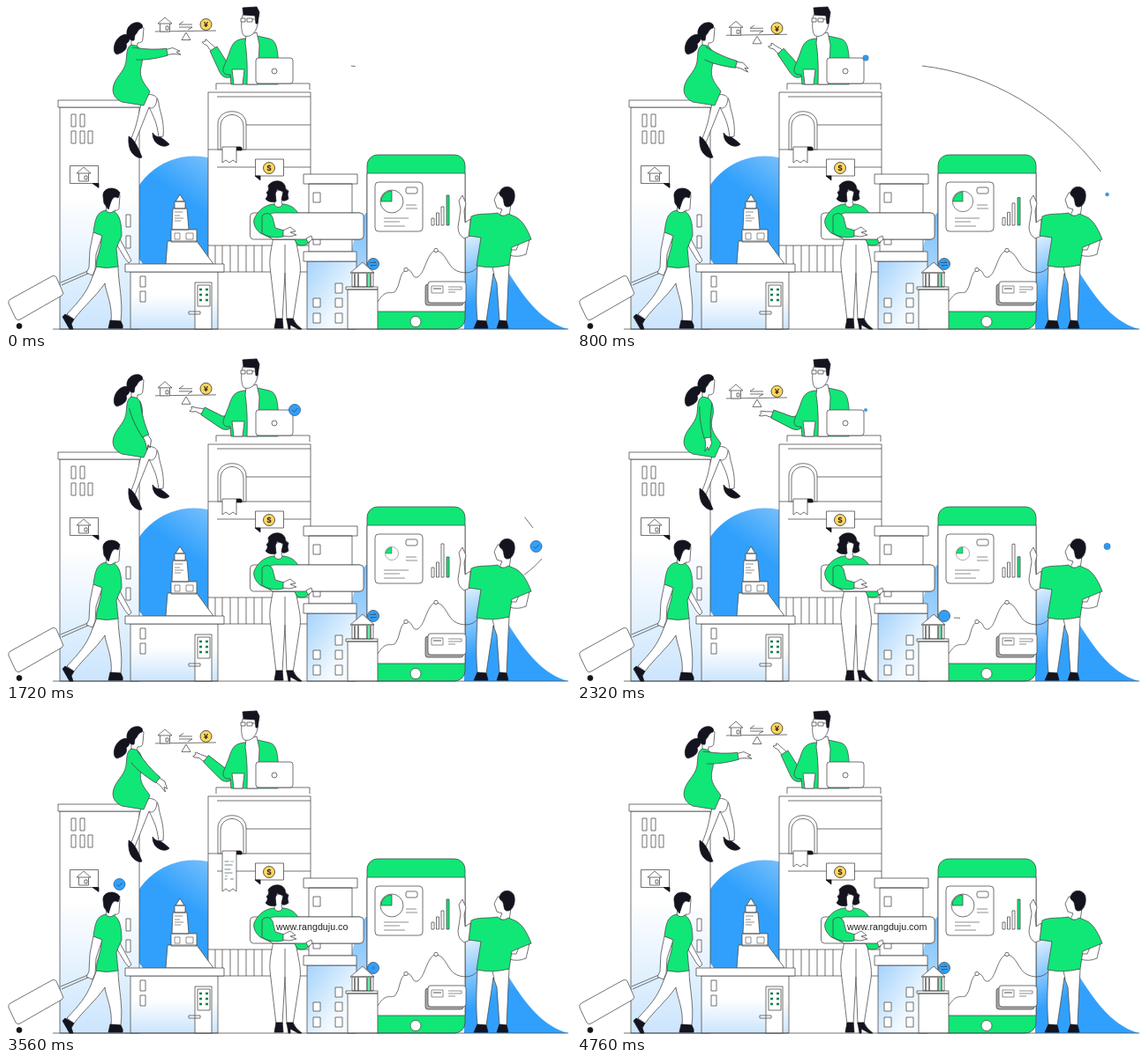
Recreate the animation shown at these times as an HTML page. Size 640 px wide and 368 px high, loop 4.8 s.

```html
<!DOCTYPE html>
<html lang="en">
<head>
<meta charset="utf-8">
<title>City services</title>
<style>
  html, body { margin: 0; width: 100%; height: 100%; overflow: hidden; background: #fff; }
  svg { display: block; width: 100vw; height: 100vh; fill: #fff; stroke: #444; stroke-width: .75; stroke-linejoin: round; }
  text { font-family: "Liberation Sans", Arial, sans-serif; fill: #222; stroke: none; }
  .line { fill: none; }
  .ink { fill: #14141f; stroke: #14141f; }
  .green { fill: #10e776; }
  .coin { fill: #ffd75e; stroke: #222; }
  .sign { font-size: 9px; font-weight: bold; text-anchor: middle; }
  .wash { fill: url(#wash); }
  .thin { fill: none; stroke-width: .6; }
</style>
</head>
<body>
<svg viewBox="0 0 640 368">
  <defs>
    <linearGradient id="wash" x1="0" y1="0" x2="0" y2="1">
      <stop offset=".4" stop-color="#fff"/><stop offset="1" stop-color="#cbe5fd"/>
    </linearGradient>
    <linearGradient id="mist" x1="0" y1="0" x2="1" y2="1">
      <stop offset="0" stop-color="#a4d3fc"/><stop offset=".7" stop-color="#f4faff"/>
    </linearGradient>
    <linearGradient id="sky" x1=".8" y1="0" x2=".4" y2=".45">
      <stop offset="0" stop-color="#8cc9fc"/><stop offset=".9" stop-color="#31a0fc"/>
    </linearGradient>
    <linearGradient id="hill" x1="0" y1="0" x2="0" y2="1">
      <stop offset="0" stop-color="#78bffb"/><stop offset="1" stop-color="#d8ebfe"/>
    </linearGradient>
    <linearGradient id="slope" gradientUnits="userSpaceOnUse" x1="520" y1="250" x2="556" y2="325">
      <stop offset=".1" stop-color="#e6f3ff"/><stop offset="1" stop-color="#31a0fc"/>
    </linearGradient>
    <clipPath id="paper"><path d="M240 166h30v60h-30z"/></clipPath>
    <g id="badge">
      <circle r="6.5" fill="#31a0fc" stroke="#1d568c"/>
      <path class="line" d="M-3 0l2.3 2.4 4-4.4"/>
    </g>
    <g id="house">
      <path d="M-5.5-1h11v10h-11z"/><path d="M-8 0L0-7 8 0z"/><path d="M1 3h3v4h-3z"/>
    </g>
  </defs>

  <!-- backdrop -->
  <path d="M155 293A75 75 0 1 1 271 293z" fill="url(#sky)" stroke="none"/>
  <path d="M380 367C388 290 395 240 410 234V367z" fill="url(#hill)" stroke="none"/>
  <path d="M519 250C560 255 575 350 637 367H519z" fill="url(#slope)" stroke="none"/>

  <!-- left tower -->
  <path class="wash" d="M61 115h90v252H61z"/>
  <path d="M59 107h97v8H59z"/>
  <path d="M74 123h5v14h-5zm10 0h5v14h-5zM74 142h5v14h-5zm10 0h5v14h-5zm9 0h5v14h-5zM136 237h5v14h-5zm0 24h5v14h-5z"/>
  <path id="arcC" class="line" pathLength="1" d="M408 298C300 305 190 282 138 215"/>

  <!-- central building -->
  <path d="M229 98h116v204H229z"/>
  <path class="line" d="M238 95V88H344V95M239 103H345M272 135H345M229 163H345M239 183H345M229 272H345M237 272v30M245 272v30M254 272v30M263 272v30M272 272v30M281 272v30M290 272v30"/>
  <path d="M240 163V134C240 115 272 115 272 134V163z"/>
  <path class="line" d="M243 163V137C243 119 269 119 269 137V163"/>
  <path class="ink" d="M261 160h4q3 0 2 4h-6z"/>
  <path id="receipt"/>
  <g clip-path="url(#paper)"><g id="print" class="thin">
    <path d="M247.5-34h5M247.5-30h9M247.5-25h7M247.5-21h9M247.5-14h3M254-14h4" stroke="#234"/>
    <path d="M254-34h4M248-17.5h3" stroke="#12b65f"/>
  </g></g>

  <!-- monument and low house -->
  <path d="M183 267h33l19 26H181zM187 254h29v14h-29zM189 230h16l2 24h-19zM191 222h12v8h-12zM192 222l5-8 5 8z"/>
  <path class="thin" d="M191 258h6v7h-6zM204 258h8v7h-8zM191 234h9M191 238h6M191 241h10M191 244h7"/>
  <path class="wash" d="M141 302h99v65h-99z"/>
  <path d="M135 293h112v9H135zM152 307h6v12h-6zm0 17h6v12h-6zM214 314h19v53h-19zM217 317h14v24h-14zM207 347h13v3h-13z"/>
  <path d="M219 322h3m4 0h3M219 328h3m4 0h3M219 334h3m4 0h3" stroke="#15804a" stroke-width="2.4"/>

  <!-- right block -->
  <path d="M343 202h49v77h-49zM337 191h61v11h-61zM348 212h8v11h-8zm0 48h8v11h-8z"/>
  <path d="M341 290h56v77h-56z" fill="url(#mist)"/>
  <path d="M337 279h60v11h-60zM348 332h8v10h-8zm0 17h8v11h-8zM373 315h8v11h-8zm0 17h8v10h-8zm0 17h8v11h-8z"/>

  <!-- phone -->
  <rect class="green" x="409" y="169" width="111" height="198" rx="12"/>
  <path d="M409 190h111v157H409z"/>
  <circle cx="464" cy="358.500" r="6"/>
  <rect x="418" y="200" width="54" height="56" rx="4"/>
  <rect x="453" y="206" width="13" height="7" rx="2"/>
  <path class="thin" d="M453 226h12M453 230h13M428 241h28M428 245h18M428 250h24"/>
  <g id="pie"><circle r="13"/><path class="green" d="M0 0V-12H-1A12 12 0 0 0-12 0z"/></g>
  <g id="bars"><path/><path/><path/><path class="green"/></g>
  <path class="line" d="M421 336C430 322 433 327 440 325C447 318 445 303 453 300C461 297 459 310 466 308C475 304 477 278 487 278C498 278 500 297 511 301C521 305 531 303 536 294"/>
  <circle cx="453" cy="299.500" r="2.200"/><circle cx="487" cy="277.500" r="2.200"/>
  <rect x="475" y="316" width="43" height="24" rx="3" fill="#aaa"/>
  <rect x="478" y="313" width="43" height="24" rx="3"/>
  <path class="thin" d="M482 318h13v8h-13zM501 319h15v3h-15M501 325h8"/>
  <path class="ink" d="M484 321h9"/>

  <!-- small temple -->
  <path d="M387 322h34v45h-34zM385 319h36v3h-36zM392 303h24v16h-24zM390 303l14-12 13 12z"/>
  <path class="line" d="M395 304v15M399 304v15M409 304v15M413 304v15" stroke-width="1.3"/>
  <path class="line" d="M411 304v15" stroke="#10e776" stroke-width="1.300"/>
  <circle cx="416" cy="293" r="6.500" fill="#31a0fc"/>
  <path id="swap" class="line" d="M-4-1.500H3l-2-2M4 1.500H-3l2 2"/>

  <!-- travelling arcs -->
  <path id="arcA" class="line" pathLength="1" d="M391 68C470 77 545 122 597 193"/>
  <path id="arcB" class="line" pathLength="1" d="M607 228C580 260 500 300 427 295"/>

  <path class="line" d="M53 367H637"/>

  <!-- speech bubbles -->
  <path d="M72.500 181.500h32v20h-32z"/><path class="ink" d="M98 201.500h7v5z"/>
  <use href="#house" x="88" y="190"/>
  <path d="M282.500 174h32v19h-32z"/><path class="ink" d="M282 193h6v5z"/>
  <circle class="coin" cx="298" cy="184" r="6.500"/>
  <g id="dollar"><text class="sign" y="3.200">$</text></g>

  <!-- balance -->
  <g id="balance">
    <path class="line" d="M169 28.500L238 27.500"/><path d="M204 29.500l5 8.500h-10z"/>
    <use href="#house" x="180" y="19.500"/>
    <path id="arrows" class="line" pathLength="1" d="M201 17l-5 3.500H211M196 23.500H211l-5 3"/>
    <circle class="coin" cx="226.500" cy="20.500" r="6.500"/><text class="sign" x="226.500" y="23.800">¥</text>
  </g>

  <!-- clerk -->
  <g id="clerkArm">
    <path d="M238 49C236 45 233 44 231 42L227 38Q225 37 226 40L222 41Q223 43 228 45Q230 50 234 52z"/>
    <path class="green" d="M239 46L251 65 259 69 254 81Q246 83 242 75L231 51z"/>
  </g>
  <path class="green" d="M270 37C259 38 256 43 253 53L246 71Q245 79 254 78L255 89H308L309 72C308 50 307 39 298 37L285 34z"/>
  <path d="M272 33L271 42Q274 60 273 89H285L287 44 284 30z"/>
  <path d="M268 10C266 19 266 31 270 34C278 36 283 30 285 21V10z"/>
  <path class="ink" d="M268 2L284 1 287 7 285 20 283 20 282 11 269 10z"/>
  <path d="M266 14h5v4h-5zm7 0h6v4h-6z"/><path class="line" d="M279 15h5"/>
  <path d="M256 72h14l-2 17h-10z"/>
  <rect x="283" y="59" width="42" height="29" rx="3"/><circle cx="304" cy="74" r="3"/>

  <!-- seated woman -->
  <path d="M158 101Q171 98 173 110C173 117 180 130 178 148L173 149C171 133 168 127 162 115L146 155 141 152C148 137 149 128 153 111z"/>
  <path class="line" d="M171 105C170 117 164 117 162 115"/>
  <path class="ink" d="M139 148Q143 150 146 155Q150 161 154 172Q149 174 143 167Q138 161 139 148zM166 144Q169 149 175 149Q181 153 185 157Q181 161 174 158Q166 154 166 144z"/>
  <path class="ink" d="M140 33C133 30 125 36 123 44C121 51 124 57 128 54C134 52 138 48 136 43Q140 41 140 36z"/>
  <path d="M142 34L142 48 148 50 149 42Q155 42 155 37L156 25 149 20z"/>
  <path class="ink" d="M139 36C133 28 141 17 151 19Q156 21 154 25C149 26 149 31 146 33L145 39Q141 40 139 36z"/>
  <path class="green" d="M142 44C136 47 137 55 136 63C134 76 122 81 121 95Q121 104 131 109L156 113 163 97C157 88 150 82 153 69C157 57 152 46 147 45z"/>
  <g id="guestArm">
    <path d="M34-3L43-5 51-1 47 0 52 3 43 2 34 3z"/>
    <path class="green" d="M-3-7C6-6 17-3 36-4.500L37 3.500C22 7 10 8 1 7"/>
  </g>

  <!-- traveller -->
  <path class="line" d="M63 317L97 302M62 314L95 300"/>
  <path d="M5 333L52 307Q55 305 57 308L64 324Q66 327 63 329L16 356Q13 358 11 355L3 338Q2 335 5 333z"/>
  <circle class="ink" cx="15" cy="363.500" r="3"/>
  <path d="M126 259L142 289 139 292 135 287 120 262z"/>
  <path d="M103 295H127C127 315 133 335 130 358H119C121 340 113 325 112 315C101 331 87 342 77 356L69 350C83 335 91 326 97 310z"/>
  <path class="ink" d="M67 350L77 356 74 361 76 367 72 367 64 353zM118 357L130 358Q133 363 132 366H116z"/>
  <path d="M114 221L113 238 122 238 123 232Q128 233 128 229L129 215 121 212z"/>
  <path class="ink" d="M110 216C109 206 124 204 129 212L127 218C122 215 120 219 118 225L116 231 111 224z"/>
  <path class="green" d="M113 232C103 234 101 241 99 257L108 261C109 274 102 285 102 296Q114 299 127 296L125 275 131 261C131 247 129 237 122 233Q117 237 113 232z"/>
  <path d="M99 257L95 277 94 297 91 303 98 306 101 299 102 282 109 261z"/>

  <!-- woman with search bar -->
  <path d="M303 262H328C330 280 335 292 333 305L325 357H318L316 303 313 357H306L299 296C298 284 301 274 303 262z"/>
  <path class="line" d="M316 271L316 303"/>
  <path class="ink" d="M306 355H313L314 366H304zM318 355H325Q327 361 335 367H331L322 362V367H320z"/>
  <rect x="276.500" y="235" width="128" height="30" rx="4"/>
  <path class="green" d="M302 225C290 227 284 235 281 242Q279 250 288 258L303 265H330V234C326 228 321 226 315 225z"/>
  <path d="M305 211L304 226Q309 231 313 226L312 222Q315 221 314 207z"/>
  <path class="ink" d="M297 204C302 197 313 197 316 204Q316 209 320 210Q318 214 320 219Q315 223 312 220L314 211 307 208 305 213 306 222Q298 224 294 219Q298 215 295 212Q299 209 297 204z"/>
  <path class="green" d="M326 264L340 260 344 268Q338 274 330 271z"/>
  <rect x="299" y="235" width="106" height="30" rx="4"/>
  <path d="M340 264l6-3 1 4-5 4z"/>
  <path class="green" d="M290 238Q298 232 302 240L305 252 315 255 314 262Q300 265 290 258z"/>
  <path d="M314 255l8-4 6 5-6 1 7 3-8 2-7-1z"/>
  <text id="url" x="306" y="250" font-size="10.700"></text>

  <!-- man at phone -->
  <path d="M526 261L519 264Q512 260 512 251L515 231 513 221 517 215 521 224 519 233 520 246 526 242z"/>
  <path d="M534 294H570L569 313 567 358H559L556 315 552 304 544 358H534C532 336 533 318 534 294z"/>
  <path class="line" d="M551 296L553 306"/>
  <path class="ink" d="M534 357L544 358 546 366H530zM559 357L567 358 569 366H556z"/>
  <path d="M584 262L593 265 589 282Q580 286 570 283L567 277 578 277z"/>
  <path d="M557 212L553 220 556 229 562 231 559 238 570 239 572 225 566 212z"/>
  <path class="ink" d="M560 210C563 203 575 204 576 213C577 221 573 229 567 228C563 227 565 221 562 217Q557 214 560 210z"/>
  <path class="green" d="M557 235C545 237 535 235 527 239L524 261 538 263 533 295Q551 299 570 294L573 274 595 265C590 252 584 242 576 239L569 236Q562 241 557 235z"/>

  <use id="badgeLaptop" href="#badge"/>
  <use id="badgeSky" href="#badge"/>
  <use id="badgeLeft" href="#badge"/>
</svg>
<script>
const LOOP = 4800;
const $ = id => document.getElementById(id);
const set = (id, name, value) => $(id).setAttribute(name, value);
const bars = [...$('bars').children];

function draw(now) {
  const t = now % LOOP;
  const ramp = (from, to, time = t) => {
    const u = Math.min(1, Math.max(0, (time - from) / (to - from)));
    return u * u * (3 - 2 * u);
  };
  const pulse = (a, b, c, d) => ramp(a, b) - ramp(c, d);
  const place = (id, x, y, scale = 1) => set(id, 'transform', `translate(${x} ${y}) scale(${scale})`);
  const reveal = (id, tail, head) => {
    set(id, 'stroke-dasharray', `0 ${tail} ${head - tail} 3`);
    set(id, 'visibility', head - tail > .006 ? 'visible' : 'hidden');
  };

  // slow swing shared by both arms and the balance
  const swing = (1 - Math.cos(2 * Math.PI * t / LOOP)) / 2;
  set('guestArm', 'transform', `translate(146 54) rotate(${-2 + 90 * swing})`);
  set('clerkArm', 'transform', `rotate(${-38 * swing} 250 76)`);
  set('balance', 'transform', `translate(0 ${.5 + 17 * swing})`);
  reveal('arrows', 0, 1 - .45 * (pulse(1500, 1720, 1760, 1980) + pulse(3340, 3540, 3600, 3800)));

  // arc A begins just before the loop wraps
  const shifted = (t + 80) % LOOP;
  reveal('arcA', ramp(1080, 1930, shifted), ramp(0, 970, shifted));
  reveal('arcB', ramp(1860, 2380), ramp(1590, 2150));
  reveal('arcC', ramp(2850, 3450), ramp(2380, 2950));

  place('badgeLaptop', 327, 59, pulse(640, 960, 2120, 2430));
  place('badgeSky', 600.5, 214, pulse(680, 1000, 2160, 2510));
  place('badgeLeft', 128.5, 198, pulse(2880, 3220, 4160, 4500));
  place('swap', 416, 293, 1 - pulse(2000, 2280, 3400, 3720));
  place('dollar', 298, 184, 1 - pulse(2700, 2960, 3120, 3400));

  // phone statistics
  const dip = pulse(400, 1650, 2250, 3080);
  place('pie', 437, 222, 1 - .42 * dip);
  [[482, 241 - 3 * dip], [487.5, 235 - 3 * dip], [493, 228 - 17 * dip], [499, 215 + 11 * dip]]
    .forEach(([x, y], i) => bars[i].setAttribute('d', `M${x} 249V${y}h3V249z`));

  const end = 178 + 28 * pulse(2750, 3550, 3950, 4600);
  set('receipt', 'd', `M245 160V${end}l4-3 4 3 4-3 4 3V160z`);
  set('print', 'transform', `translate(0 ${end})`);

  $('url').textContent = 'www.rangduju.com'.slice(0, Math.max(0, Math.floor((t - 2850) / 47)));
  requestAnimationFrame(() => draw(performance.now()));
}
draw(performance.now());
</script>
</body>
</html>
```
